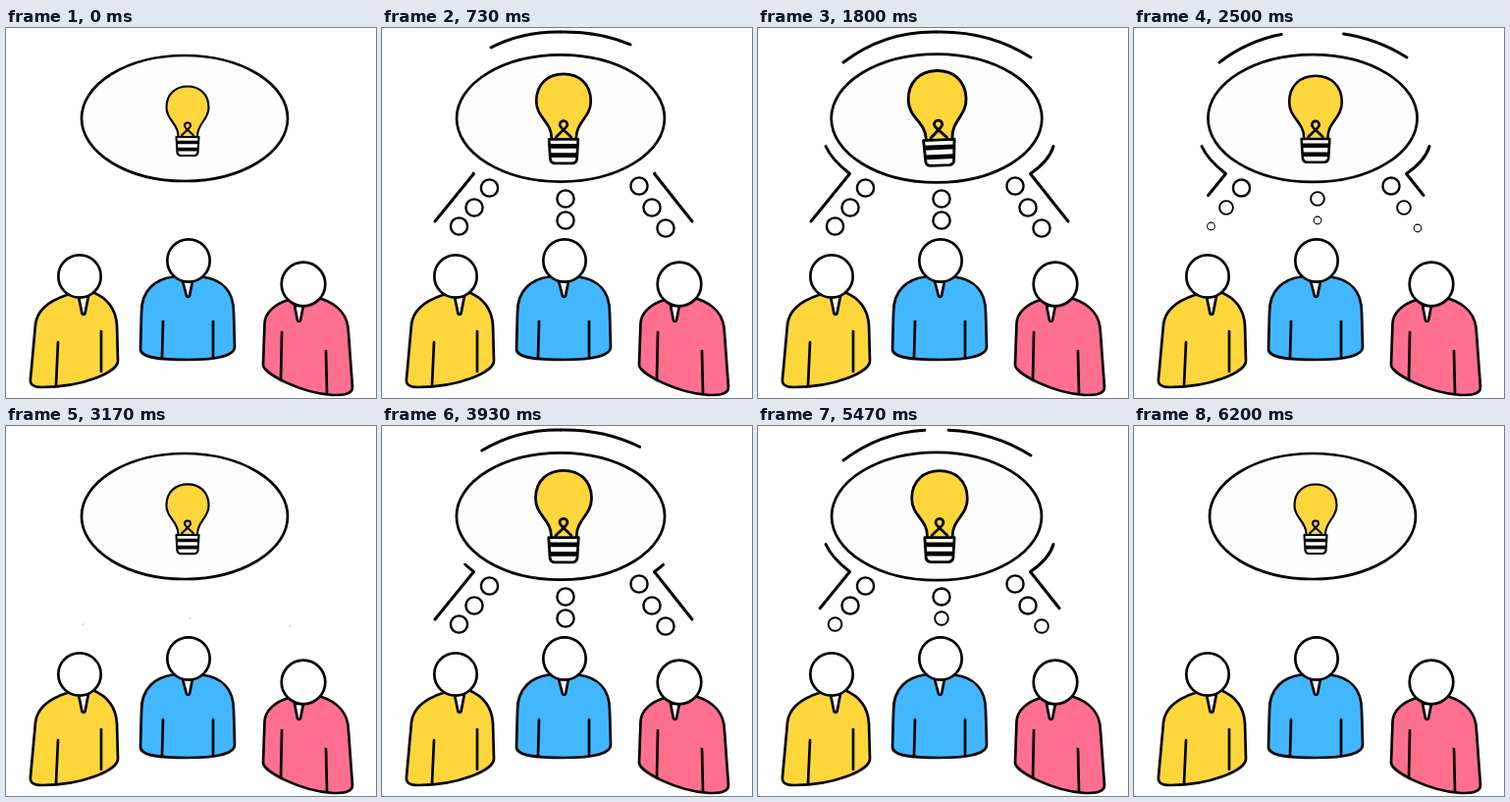
An HTML page for the animation above (6230 ms loop, 377 by 377 pixels).

```html
<!DOCTYPE html>
<html>
<head>
<meta charset="utf-8">
<title>Shared idea</title>
<style>
  html, body { margin: 0; width: 100%; height: 100%; overflow: hidden; background: #fff; }
  svg { display: block; width: 100vw; height: 100vh; }
</style>
</head>
<body>
<svg viewBox="0 0 377 377" fill="none" stroke="#000" stroke-width="2.7" stroke-linecap="round" stroke-linejoin="round">
  <ellipse id="cloud" cx="182" cy="92" rx="105" ry="64" fill="#fdfdfd"/>

  <g id="bulb" stroke-width="2.1">
    <path fill="#fdd63c" d="M175.500 110C175.500 97 163.500 94 163.500 81C163.500 67 173 59.500 185 59.500S206.500 67 206.500 81C206.500 94 195 97 195 110"/>
    <path d="M179 109.500C183 105 188 102 188 99.500A3 3 0 0 0 182 99.500C182 102 187 105 191 109.500"/>
    <path fill="#fff" d="M173.500 111H196.500L195.500 127Q195 129.800 192 130H178Q175 129.800 174.500 127Z"/>
    <path stroke-width="3.6" stroke-linecap="butt" d="M173.500 116.500H196.500M174 123.600H196"/>
  </g>

  <g id="arcs" stroke-width="3">
    <path pathLength="1" d="M182 4Q129 3 87 35"/>
    <path pathLength="1" d="M182 4Q236 3 278 30"/>
  </g>
  <g id="sides" stroke-width="3">
    <path pathLength="1" d="M54 197L93.500 148.500Q75 134 69 120.500"/>
    <path pathLength="1" d="M316 197L277.500 148.500Q297 135 301 120.500"/>
  </g>
  <g id="dots" fill="#fff" stroke-width="2.4"></g>

  <g>
    <path fill="#fdd63c" d="M25 357L30 302C32 284 50 276 62 272L88 269C103 275 112 286 113 303L114 339C114 351 77 366 37 366C27 366 24 363 25 357Z"/>
    <path d="M53 320L51 364M97 309V350"/>
    <path fill="#fff" d="M74 274L77.500 291Q79 293 80.500 291L84 273Z"/>
    <circle cx="75" cy="253" r="21.7" fill="#fff"/>
  </g>
  <g>
    <path fill="#42b6ff" d="M137 327L138 290C138 266 153 256 170 253.500H200C220 256 232 268 232 290L233 325C233 335 210 338 185 338C156 338 137 336 137 327Z"/>
    <path d="M160 299L159 335M211 299V335"/>
    <path fill="#fff" d="M180 258L184 273Q185 275 187 273L190 258Z"/>
    <circle cx="186" cy="237" r="21.7" fill="#fff"/>
  </g>
  <g>
    <path fill="#ff7090" d="M262 343L263.500 301C264 290 274 281 288 277L320 275.500C338 281 349 293 349 311L353 366C353 374 342 374 333 374C300 372 262 352 262 343Z"/>
    <path d="M281 310L280 359M326 329L327 372"/>
    <path fill="#fff" d="M294 283L297 298Q298 300 300 298L303 283Z"/>
    <circle cx="303" cy="261" r="22.3" fill="#fff"/>
  </g>
</svg>
<script>
const LOOP = 6230, CYCLE = LOOP / 2;
const $ = id => document.getElementById(id);

// Eased progress from 0 to 1 between two times
const ease = (t, from, to) => {
  const u = Math.min(1, Math.max(0, (t - from) / (to - from)));
  return u * u * (3 - 2 * u);
};

const scaleAt = (el, x, y, k, turn = '') =>
  el.setAttribute('transform', `${turn} translate(${x} ${y}) scale(${k}) translate(${-x} ${-y})`);

function trim(group, start, end) {
  for (const path of group.children) {
    path.style.display = end - start > 0.001 ? '' : 'none';
    path.setAttribute('stroke-dasharray', `${end - start} 2`);
    path.setAttribute('stroke-dashoffset', -start);
  }
}

// Thought dots: x, y, order of appearance
const dots = [
  [78.5, 202, 0], [94, 183, 1], [109.5, 163, 2],
  [289, 204, 0], [275, 183, 1], [262, 161, 2],
  [187, 196, 0], [187, 174, 1]
].map(([x, y, order]) => {
  const el = document.createElementNS('http://www.w3.org/2000/svg', 'circle');
  el.setAttribute('r', 8.6);
  $('dots').append(el);
  return { el, x, y, delay: order * 150 };
});

function draw(now) {
  const t = now % CYCLE;
  const shrink = ease(t, 2120, 3110);
  const grow = ease(t, 0, 1040) - shrink;
  // The bulb sways once while it is fully grown
  const sway = t > 1040 && t < 2120 ? 2.5 * Math.sin((t - 1040) / 1080 * 2 * Math.PI) : 0;
  scaleAt($('cloud'), 182, 92, 1 + 0.022 * (ease(t, 0, 1700) - shrink));
  scaleAt($('bulb'), 185, 103, 1 + 0.37 * grow, `rotate(${sway} 185 130)`);
  trim($('arcs'), ease(t, 2160, 3075), ease(t, 60, 1090));
  trim($('sides'), ease(t, 2130, 3075), ease(t, 90, 1180));
  for (const { el, x, y, delay } of dots) {
    const k = ease(t, delay, delay + 400) - ease(t, delay + 2180, delay + 2780);
    el.setAttribute('transform', `translate(${x} ${y}) scale(${k})`);
  }
  requestAnimationFrame(tick);
}

const begin = performance.now();
const tick = () => draw(performance.now() - begin);
tick();
</script>
</body>
</html>
```
